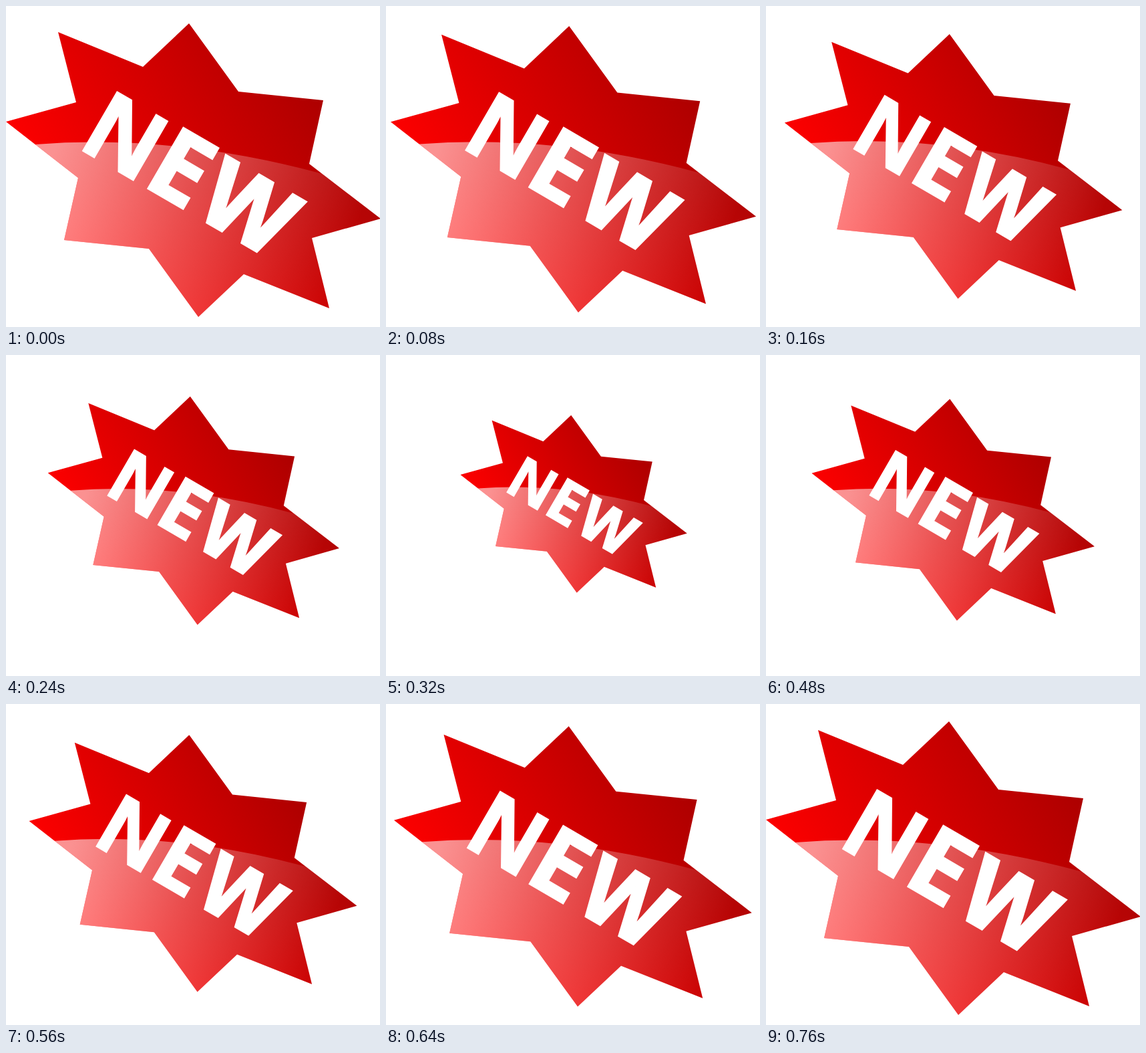
An HTML page that plays this animation: 560x480 px, repeating every 0.8 s.

```html
<!DOCTYPE html>
<html lang="en">
<head>
<meta charset="utf-8">
<title>New badge</title>
<style>
  html, body { margin: 0; width: 100%; height: 100%; overflow: hidden; background: #fff; }
  svg { display: block; width: 560px; height: 480px; }
  #badge { transform-origin: 282px 188px; }
  text {
    font: 700 147px "Liberation Sans", Arial, sans-serif;
    fill: #fff; stroke: #fff; stroke-width: 3px;
  }
  .narrow { font-family: "Open Sans", "Noto Sans", sans-serif; }
  .heavy { font-size: 145px; stroke-width: 5px; }
</style>
</head>
<body>
<svg viewBox="0 0 560 480">
  <defs>
    <linearGradient id="red" gradientUnits="userSpaceOnUse" x1="0" y1="173" x2="360" y2="-52">
      <stop offset="0" stop-color="#fc0000"/>
      <stop offset="1" stop-color="#ac0000"/>
    </linearGradient>
    <linearGradient id="shine" gradientUnits="userSpaceOnUse" x1="70" y1="220" x2="500" y2="390">
      <stop offset="0" stop-color="#fff" stop-opacity=".57"/>
      <stop offset=".45" stop-color="#fff" stop-opacity=".31"/>
      <stop offset="1" stop-color="#fff" stop-opacity=".02"/>
    </linearGradient>
    <polygon id="star" points="78,39 205,91 274,26 348,128 475,141 454,236 561,318 458,347
      484,452 356,401 288,465 214,363 87,350 108,257 0,173 105,144"/>
    <clipPath id="edge"><use href="#star"/></clipPath>
  </defs>
  <g id="badge">
    <use href="#star" fill="url(#red)"/>
    <path d="M44 207Q250 191 470 250H562V480H0V207Z" fill="url(#shine)" clip-path="url(#edge)"/>
    <g transform="translate(114 217) rotate(30.2)">
      <text x="-8.6" y="-1.5">N<tspan class="narrow" x="100.3">E</tspan><tspan class="heavy" x="190" y="-2.5">W</tspan></text>
    </g>
  </g>
</svg>
<script>
  const STEPS = 20, LOW = 9, LAST = 19;

  // Shrink to half with a quadratic ease-in, then grow back with an ease-out.
  function pose(i) {
    const back = i > LOW;
    const u = back ? (LAST - i) / (LAST - LOW) : i / LOW;
    const shift = back && i < LAST ? -0.7 : 0;
    return `translate(${shift}px, 0px) scale(${1 - 0.5 * u * u})`;
  }

  const frames = Array.from({ length: STEPS + 1 }, (_, i) => ({
    offset: i / STEPS,
    transform: pose(i % STEPS),
    easing: "step-end"
  }));

  document.getElementById("badge").animate(frames, { duration: 800, iterations: Infinity });
</script>
</body>
</html>
```
